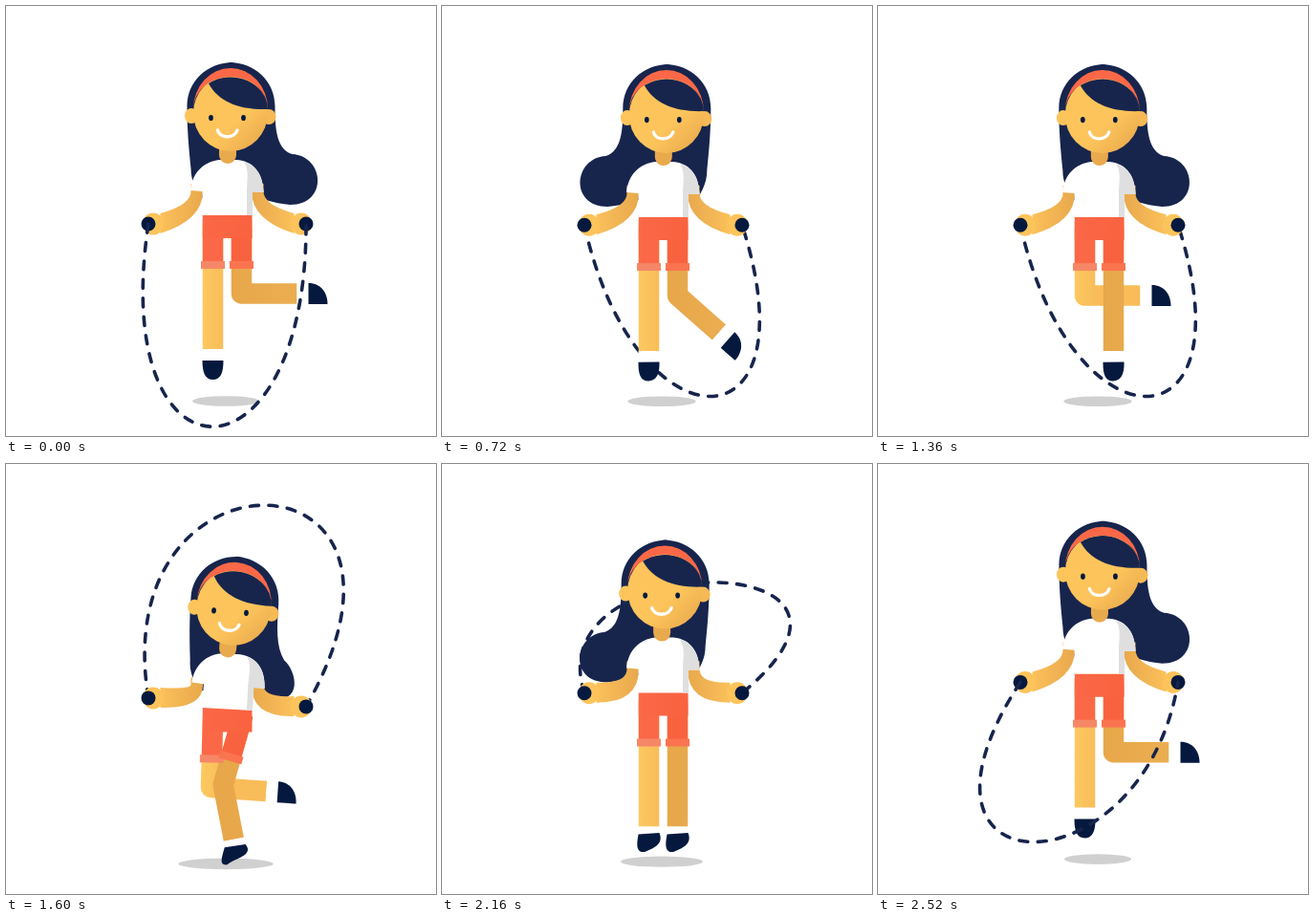
Write an HTML page with a canvas that moves like this. It is 450 by 450 pixels and loops after 2560 ms.

```html
<!DOCTYPE html>
<html lang="en">
<head>
<meta charset="utf-8">
<title>Jump rope</title>
<style>
html, body { margin: 0; width: 100%; height: 100%; overflow: hidden; background: #fff; }
canvas { display: block; }
</style>
</head>
<body>
<canvas id="stage" width="450" height="450"></canvas>
<script>
const ctx = document.getElementById('stage').getContext('2d');
const LOOP = 2560, HOP = 640, BOTTOM = 350, RAD = Math.PI / 180;
const HAIR = '#17254d', NAVY = '#05193f', SKIN = '#fdc45b', SHADE = '#e9aa4d', CORAL = '#fb6847';

const clamp = v => Math.max(0, Math.min(1, v));
function ease(from, to, t) {
  const k = clamp((t - from) / (to - from));
  return k * k * (3 - 2 * k);
}

// How far the body has dropped from the top of a hop
const dropAt = phase =>
  45 * (phase < BOTTOM ? phase / BOTTOM : (HOP - phase) / (HOP - BOTTOM)) ** 2.1;
// Knee bend in degrees: held up for one hop, lowered, raised again at the end of the loop
const bendAt = t => 90 * (1 - ease(605, 850, t) + ease(2300, 2500, t));

function fill(d, color) {
  ctx.fillStyle = color;
  ctx.fill(new Path2D(d));
}
function line(d, color, width, cap = 'butt') {
  ctx.strokeStyle = color;
  ctx.lineWidth = width;
  ctx.lineCap = cap;
  ctx.lineJoin = 'round';
  ctx.stroke(new Path2D(d));
}
function oval(x, y, rx, ry, color) {
  ctx.fillStyle = color;
  ctx.beginPath();
  ctx.ellipse(x, y, rx, ry, 0, 0, 7);
  ctx.fill();
}
function group(draw) {
  ctx.save();
  draw();
  ctx.restore();
}
function turn(x, y, angle) {
  ctx.translate(x, y);
  ctx.rotate(angle);
  ctx.translate(-x, -y);
}
function fade(x0, y0, x1, y1, ...colors) {
  const g = ctx.createLinearGradient(x0, y0, x1, y1);
  colors.forEach((c, i) => g.addColorStop(i / (colors.length - 1), c));
  return g;
}

// One Bezier curve whose two control points circle around the hands
function drawRope(phase, left, right) {
  const a = phase / HOP * 2 * Math.PI;
  const sin = Math.sin(a), cos = Math.cos(a), sin2 = Math.sin(2 * a), cos2 = Math.cos(2 * a);
  const dy = 88 * sin + 278 * cos + 22 * cos2 - 18;
  const c1 = [left[0] + 136 * sin + 52 * sin2 + 50 * cos2 - 95, left[1] + dy];
  const c2 = [right[0] + 101 * sin - 79 * cos + 18 * cos2 + 61, right[1] + dy];
  ctx.setLineDash([9, 10.5]);
  line(`M${left}C${c1} ${c2} ${right}`, HAIR, 3.6, 'round');
  ctx.setLineDash([]);
}

function drawShoe(bent, ground) {
  const x = -11 * bent - 12 * ground, y = 20 - 2 * ground;
  fill(`M-11,0H11C${11 + 9 * ground},13 ${x + 8 + 4 * bent},${y - 6 * ground} ${x},${y}` +
    `C${x - 8 * (1 - bent)},${y} ${-11 - 7 * ground},13 -11,0Z`, NAVY);
}

function drawLeg(x, thigh, shin, ground, bent, color) {
  const kx = x - 71 * Math.sin(thigh), ky = 230 + 71 * Math.cos(thigh);
  const fx = kx - 58 * Math.sin(shin), fy = ky + 58 * Math.cos(shin);
  const flat = ground * (1 - bent);
  line(`M${x},230L${kx},${ky}L${fx},${fy}`, color, 21.5);
  group(() => {
    ctx.translate(kx, ky);
    ctx.rotate(shin);
    fill('M-11,58h22v12.5h-22z', '#fff');
    ctx.translate(0, 70 - 5 * clamp(2 * flat));
    ctx.rotate(-(shin + 8 * RAD) * flat);
    drawShoe(bent, flat);
  });
}

function drawShortsLeg(x, thigh, color, hem) {
  group(() => {
    ctx.translate(x, 230);
    ctx.rotate(thigh);
    fill('M-10.7,-6h21.4v44h-21.4z', color);
    fill('M-12.5,37h25v8h-25z', hem);
  });
}

function drawArm(side, y, hand) {
  const x = v => 231.5 + side * v, h = hand[1], elbow = Math.min(11, y / 2);
  fill(`M${x(25.5)},${186 + y}H${x(38)}V${193 + y}Q${x(37)},${h - 20 + elbow} ${x(70)},${h - 11}` +
    `V${h + 10}Q${x(25.5)},${h - 4 + elbow * 1.4} ${x(25.5)},${194 + y}Z`,
    fade(x(28), 0, x(75), 0, SHADE, '#f3b655', SKIN));
  oval(x(77.5), h, 11, 11.5, SKIN);
  oval(...hand, 7.5, 7.5, NAVY);
}

// Two mirrored halves; the one on the swing side throws out a curl
function drawHair(swing) {
  for (const side of [1, -1]) group(() => {
    const a = clamp(swing * side), b = a * a;
    ctx.translate(235.5, 0);
    ctx.scale(side, 1);
    fill(`M-2,59C25,59 46,79 46,105C46,130 ${44 + 4 * a},150 ${42 + 22 * a},${170 - 15 * b}` +
      `C${42 + 12 * a + 44 * b},${184 - 27 * b} ${36 + 66 * a},${192 + 16 * a} ${32 + 30 * a},${200 + 8 * a}` +
      `Q${20 + 18 * a},206 0,190L-2,160Z`, HAIR);
  });
}

function drawShirt() {
  fill('M223,161H242C262,163 269,178 269.5,195H258V219H205.5V194L193,193C195,174 207,163 223,161Z', '#fff');
  fill('M249,163C264,168 269,180 269.5,195H258V219H252V196C252,182 255,172 249,163Z', '#dfdfe0');
}

function drawHead() {
  fill('M223,146H241V156A9,9 0 0 1 223,156Z', SHADE);
  oval(194, 115, 7, 8, SKIN);
  oval(275, 116, 7.5, 8, '#f6b954');
  oval(235, 112, 39, 40, fade(215, 95, 266, 148, SKIN, SKIN, SHADE));
  fill('M212,81C222,100 244,109 274,108A39,34 0 0 0 212,81Z', HAIR);
  fill('M196,108A39,43 0 0 1 274,108A39,34 0 0 0 196,108Z', CORAL);
  oval(214.5, 117, 2.4, 3.1, NAVY);
  oval(248.5, 117, 2.4, 3.1, NAVY);
  line('M221.5,130C224,139 239,139 242,130', '#fff', 3.4, 'round');
}

function draw(time) {
  const t = time % LOOP, phase = t % HOP, hop = Math.floor(t / HOP);
  const y = dropAt(phase), squat = clamp((y - 21) / 21), ground = clamp(y / 42);
  const swing = (1 - 2 * ease(220, 600, phase)) * (hop % 2 ? -1 : 1);
  // Lean over the standing leg on single-leg landings
  const tilt = [-4, 0, 4, 0][hop] * RAD * squat;
  const handY = 228 + y * .57;
  const left = [149, handY - tilt * 82], right = [314, handY + tilt * 82];
  const inFront = phase < 20 || phase > 420;

  const legPose = time => {
    const bend = bendAt(time % LOOP), stance = squat * (1 - bend / 90);
    return [18 * stance * RAD + tilt / 2, -(14 * stance + bend * (1 - .055 * squat)) * RAD,
      ground, clamp(bend / 45)];
  };
  const legL = legPose(t + LOOP / 2), legR = legPose(t);
  const lean = () => { ctx.translate(0, y); turn(231, 218, tilt); };
  const nod = () => { lean(); ctx.translate(-.09 * y, 0); turn(232, 160, tilt * .35); };

  ctx.fillStyle = '#fff';
  ctx.fillRect(0, 0, 450, 450);
  oval(230, 413.5 + y * .13, 35 + y * .39, 5.3 + y * .015, '#d0d0d0');
  if (!inFront) drawRope(phase, left, right);
  group(() => { nod(); drawHair(swing); });
  drawArm(-1, y, left);
  drawArm(1, y, right);
  group(() => {
    ctx.translate(0, y);
    drawLeg(216.5, ...legL, fade(206, 0, 227, 0, '#fdc860', '#f8bd59'));
    drawLeg(246.5, ...legR, fade(236, 0, 300, 0, '#e7a74a', '#eaae51'));
    drawShortsLeg(216.5, legL[0], CORAL, '#f58767');
    drawShortsLeg(246.5, legR[0], '#f9623f', '#fa7450');
    fill('M205.8,217H257.5V243H205.8Z', fade(206, 0, 258, 0, CORAL, '#f9623f'));
  });
  group(() => { lean(); drawShirt(); });
  group(() => { nod(); drawHead(); });
  if (inFront) drawRope(phase, left, right);
}

const start = performance.now();
function tick() {
  draw(performance.now() - start);
  requestAnimationFrame(tick);
}
tick();
</script>
</body>
</html>
```
